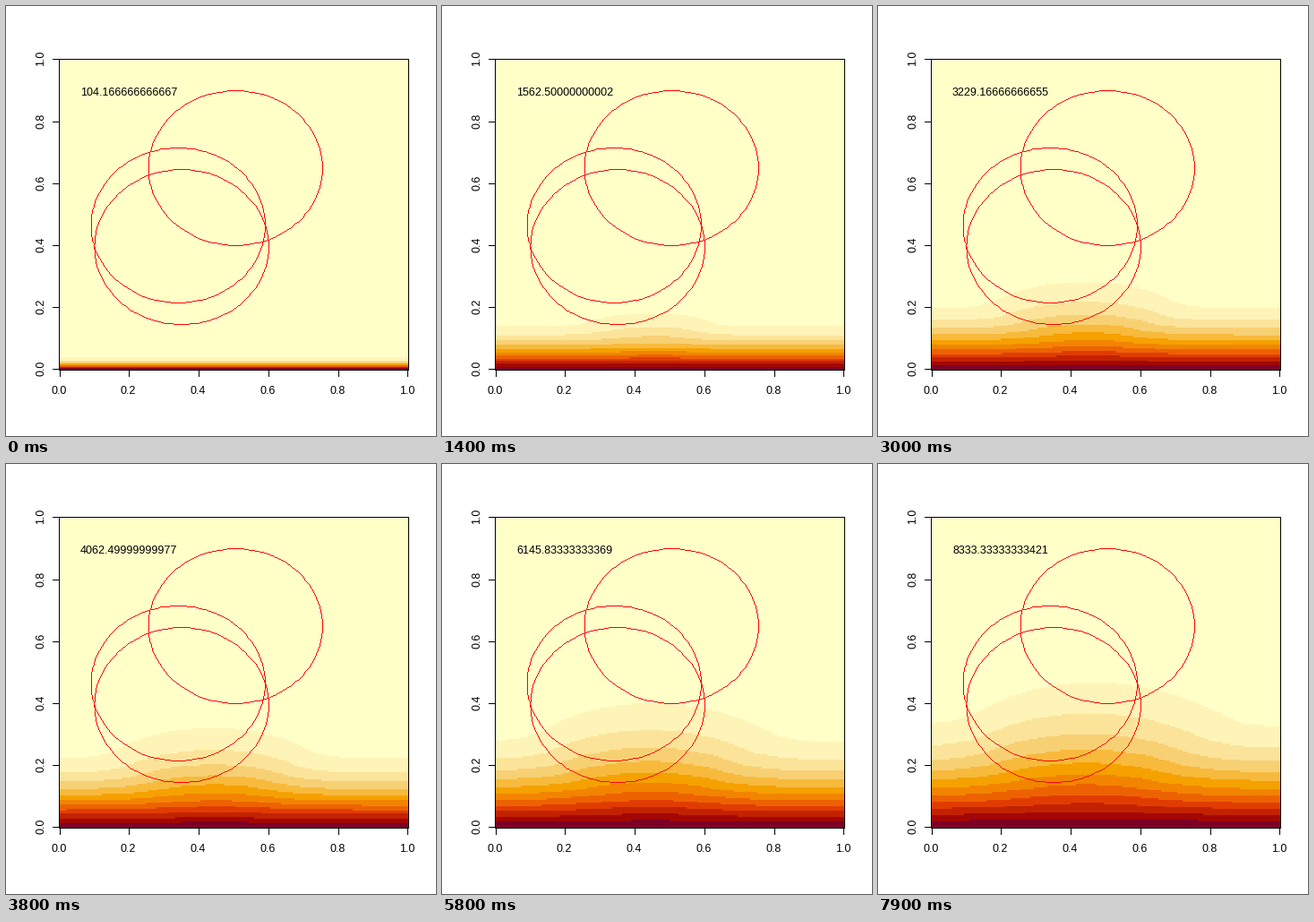
A matplotlib script for the animation above (8 s loop, 480 by 480 pixels).

```python
import numpy as np
import matplotlib.pyplot as plt
from matplotlib.animation import FuncAnimation

STAGE, DPI = 480, 96
PX = 72 / DPI
FRAMES, STEPS = 80, 100

# Plot region in pixels
LEFT, RIGHT, TOP, BOTTOM = 59.04, 449.76, 59.04, 406.56
X0, X1, Y0, Y1 = (int(edge) for edge in (LEFT, RIGHT, TOP, BOTTOM))

# Heat model: hot bottom edge, three faster-conducting discs
N = 200
DX = 1 / N
D_BASE, D_DISC = 2e-6, 6e-6
DT = 25 / 24
RADIUS = 0.25
CENTRES = [(0.35, 0.395), (0.34, 0.465), (0.505, 0.65)]

CELL_W, CELL_H = (RIGHT - LEFT) / N, (BOTTOM - TOP) / N


def to_px(x, y):
    """Data coordinates to whole device pixels."""
    px = LEFT + CELL_W * (0.5 + np.asarray(x) * (N - 1))
    py = BOTTOM - CELL_H * (0.5 + np.asarray(y) * (N - 1))
    return px.astype(int), py.astype(int)


def hcl(h, c, l):
    """Polar LUV colour to sRGB bytes."""
    a = np.radians(h)
    y = ((l + 16) / 116) ** 3
    u = c * np.cos(a) / (13 * l) + 0.1978398
    v = c * np.sin(a) / (13 * l) + 0.4683363
    x = 9 * y * u / (4 * v)
    z = -x / 3 - 5 * y + 3 * y / v
    m = np.array([[3.240479, -1.537150, -0.498535],
                  [-0.969256, 1.875992, 0.041556],
                  [0.055648, -0.204043, 1.057311]])
    rgb = np.clip(m @ np.array([x, y, z]), 0, 1)
    rgb = np.where(rgb > 0.00304, 1.055 * rgb ** (1 / 2.4) - 0.055, 12.92 * rgb)
    return np.round(255 * np.clip(rgb, 0, 1)).astype(np.uint8)


def heat_palette(n=12):
    """Sequential yellow-orange-red ramp, pale to dark."""
    peak = 1 / (1 + (180 - 75) / (180 - 40))
    colours = []
    for i in np.linspace(0, 1, n):
        s = i ** 1.6
        if s <= peak:
            chroma = 40 + 140 * s / peak
        else:
            chroma = 180 - 105 * (s - peak) / (1 - peak)
        colours.append(hcl(85 - 80 * i, chroma, 99 - 74 * i ** 1.3))
    return np.array(colours)


def simulate():
    """Colour level of each cell and the clock text, once per frame."""
    grid = np.arange(N) * DX
    gx, gy = np.meshgrid(grid, grid)
    diff = np.full((N, N), D_BASE)
    for a, b in CENTRES:
        # The discs lie mirrored on the diagonal from their outlines
        diff[(gx - b) ** 2 + (gy - a) ** 2 < RADIUS ** 2] = D_DISC
    k = (diff * DT / DX ** 2)[1:-1, 1:-1]

    u = np.zeros((N, N))
    u[0] = 1
    clock = 0.0
    levels, labels = [], []
    for _ in range(FRAMES):
        for _ in range(STEPS):
            mid = u[1:-1, 1:-1]
            lap = u[2:, 1:-1] + u[:-2, 1:-1]
            lap += u[1:-1, 2:]
            lap += u[1:-1, :-2]
            lap -= 4 * mid
            lap *= k
            mid += lap
            u[:, 0] = u[:, 1]
            u[:, -1] = u[:, -2]
            clock += DT
        levels.append(np.clip(u * 12, 0, 11).astype(np.uint8))
        labels.append(f"{clock:.15g}")
    return levels, labels


def outline_mask():
    """One-pixel polygon outlines of the discs."""
    mask = np.zeros((Y1 - Y0 + 1, X1 - X0 + 1), bool)
    angle = np.linspace(0, 2 * np.pi, 101)
    for cx, cy in CENTRES:
        px, py = to_px(cx + RADIUS * np.cos(angle), cy + RADIUS * np.sin(angle))
        for xa, ya, xb, yb in zip(px, py, px[1:], py[1:]):
            n = max(abs(xb - xa), abs(yb - ya)) + 1
            xs = np.rint(np.linspace(xa, xb, n)).astype(int)
            ys = np.rint(np.linspace(ya, yb, n)).astype(int)
            mask[ys - Y0, xs - X0] = True
    return mask


PALETTE = heat_palette()
LEVELS, LABELS = simulate()
OUTLINE = outline_mask()

# Cell under each pixel of the plot region
COLS = ((np.arange(X0, X1 + 1) + 1 - LEFT) / CELL_W).astype(int).clip(0, N - 1)
ROWS = N - 1 - ((np.arange(Y0, Y1 + 1) + 1 - TOP) / CELL_H).astype(int).clip(0, N - 1)


def heat_image(i):
    rgb = PALETTE[LEVELS[i][np.ix_(ROWS, COLS)]]
    rgb[OUTLINE] = 255, 0, 0
    return rgb


plt.rcParams["font.family"] = "Liberation Sans"

fig = plt.figure(figsize=(STAGE / DPI, STAGE / DPI), dpi=DPI, facecolor="white")
ax = fig.add_axes([0, 0, 1, 1])
ax.axis("off")

image = ax.imshow(heat_image(0), extent=(X0, X1 + 1, Y1 + 1, Y0),
                  interpolation="nearest", aspect="auto", zorder=0)
ax.set_xlim(0, STAGE)
ax.set_ylim(STAGE, 0)


def line(x, y):
    # Snapping moves whole coordinates to pixel centres
    ax.plot(x, y, color="black", lw=PX, antialiased=False, snap=True,
            solid_capstyle="projecting", zorder=3)


def label(x, y, s, **kw):
    return ax.text(x, y, s, size=12.5 * PX, ha="center", va="baseline",
                   rotation_mode="anchor", zorder=4, **kw)


line([X0, X1, X1, X0, X0], [Y0, Y0, Y1, Y1, Y0])
for v in np.linspace(0, 1, 6):
    tx, ty = to_px(v, v)
    line([tx, tx], [Y1, Y1 + 7])
    line([X0 - 7, X0], [ty, ty])
    label(tx - 0.5, 433, f"{v:.1f}")
    label(42.5, ty - 0.5, f"{v:.1f}", rotation=90)

clock_text = label(137, 100.5, LABELS[0])


def update(i):
    image.set_data(heat_image(i))
    clock_text.set_text(LABELS[i])
    return image, clock_text


anim = FuncAnimation(fig, update, frames=FRAMES, interval=100,
                     repeat=True, repeat_delay=0)
plt.show()
```
